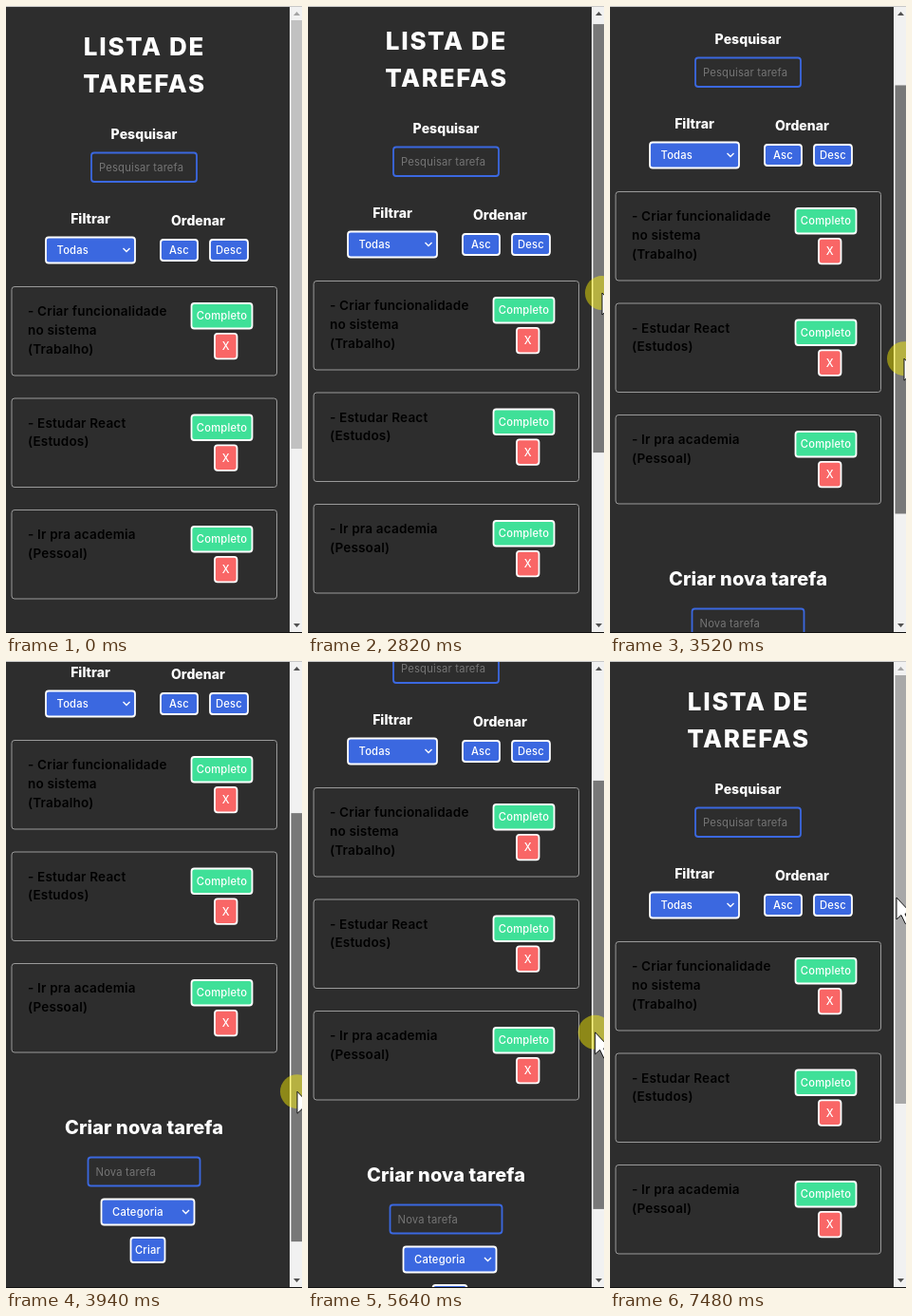
Animation, 312 px wide and 660 px high, one loop 8 s. Source, as an HTML page:

```html
<!DOCTYPE html>
<html lang="pt">
<head>
<meta charset="utf-8">
<title>Lista de tarefas</title>
<style>
html, body { margin: 0; width: 100%; height: 100%; overflow: hidden; background: #2d2d2d; }
svg { display: block; }
text { font: 500 11.2px Inter, "Open Sans", sans-serif; letter-spacing: .2px; fill: #fff; }
.mid { text-anchor: middle; }
.title { font-size: 26px; font-weight: 800; letter-spacing: 1.7px; }
.label { font-size: 14px; font-weight: 800; letter-spacing: .05px; }
.head { font-size: 20px; font-weight: 800; letter-spacing: .1px; }
.task { font-size: 13.5px; font-weight: 600; letter-spacing: .2px; fill: #000; }
.hint { font-weight: 400; fill: #757575; }
</style>
</head>
<body>
<svg width="312" height="660" viewBox="0 0 312 660">
  <rect width="312" height="660" fill="#2d2d2d"/>
  <g id="page"></g>
  <rect width="312" height="1" fill="#c8c8c8"/>
  <rect y="659" width="312" height="1" fill="#111"/>
  <rect x="299" y="1" width="13" height="658" fill="#f1f1f1"/>
  <rect id="thumb" x="300.5" width="11.5" height="451"/>
  <path id="up" d="M303 10l3.5-4 3.5 4z"/>
  <path id="down" d="M303 650l3.5 4 3.5-4z"/>
  <g id="pointer">
    <circle id="halo" r="18" fill="rgba(255,245,0,.46)"/>
    <path d="M0 0V23L5 18.5 9.3 27.5 12.8 26 9 17H16Z" fill="#fff" stroke="#111"/>
  </g>
</svg>
<script>
const $ = id => document.getElementById(id);
const BLUE = '#3b68e0', GREEN = '#3fe098', RED = '#f96666';
const MAX_SCROLL = 260, THUMB_TRAVEL = 178;
const PRESS = 2620, RELEASE = 7480, LOOP = 8000;

const text = (x, y, str, cls = '') => `<text x="${x}" y="${y}" class="${cls}">${str}</text>`;
const box = (x, y, w, h, fill, stroke = '#fff') =>
  `<rect x="${x + 1}" y="${y + 1}" width="${w - 2}" height="${h - 2}" rx="3" fill="${fill}" stroke="${stroke}" stroke-width="1.8"/>`;
const button = (x, y, w, h, str, fill = BLUE) =>
  box(x, y, w, h, fill) + text(x + w / 2, y + h / 2 + 4, str, 'mid');
const input = (x, y, w, h, str) =>
  box(x, y, w, h, 'none', BLUE) + text(x + 9, y + 20, str, 'hint');
const select = (x, y, w, h, str) =>
  box(x, y, w, h, BLUE) + text(x + 12.5, y + 18, str) +
  `<path d="M${x + w - 13.5} ${y + 12.5}l3.5 3.5 3.5-3.5" fill="none" stroke="#fff" stroke-width="1.4"/>`;
const card = (lines, i) => {
  const y = 295 + i * 117.5;
  return `<rect x="6" y="${y + .5}" width="279.5" height="93.5" rx="3" fill="none" stroke="#9a9a9a"/>` +
    lines.map((s, n) => text(23, y + 31 + n * 19.8, s, 'task')).join('') +
    button(194.5, y + 17, 66, 28.5, 'Completo', GREEN) +
    button(219, y + 48.8, 25.5, 28.5, 'X', RED);
};

$('page').innerHTML = [
  text(146, 52, 'LISTA DE', 'title mid'),
  text(146, 91, 'TAREFAS', 'title mid'),
  text(145.5, 140, 'Pesquisar', 'label mid'),
  input(89, 153.5, 113, 32.5, 'Pesquisar tarefa'),
  text(89, 229, 'Filtrar', 'label mid'),
  text(202.5, 231, 'Ordenar', 'label mid'),
  select(41, 242.5, 96, 29, 'Todas'),
  button(162, 245, 41, 24, 'Asc'),
  button(214, 245, 42, 24, 'Desc'),
  ...[
    ['- Criar funcionalidade', 'no sistema', '(Trabalho)'],
    ['- Estudar React', '(Estudos)'],
    ['- Ir pra academia', '(Pessoal)']
  ].map(card),
  text(145.5, 710, 'Criar nova tarefa', 'head mid'),
  input(85.5, 733.5, 120, 32, 'Nova tarefa'),
  select(99.5, 777.5, 100, 29, 'Categoria'),
  button(130.5, 818, 38, 28, 'Criar')
].join('');

// time, pointer x, pointer y, scroll offset
const keys = [
  [1200, 288, 640, 0], [1950, 304, 311, 0], [2360, 308, 297, 0], [2620, 309, 298, 0],
  [2820, 310, 302, 6], [3520, 310, 371, 100], [3940, 307, 453, 212], [4180, 305, 512, 260],
  [4280, 304, 525, 260], [4630, 292, 487, 260], [4960, 292, 487, 260], [5170, 292, 478, 260],
  [5260, 295, 466, 257], [5990, 306, 319, 43], [6180, 305, 288, 0], [6480, 304, 256, 0],
  [6750, 302, 249, 0], [8000, 302, 249, 0]
];

const slope = (i, c) => keys[i] && keys[i + 1]
  ? (keys[i + 1][c] - keys[i][c]) / (keys[i + 1][0] - keys[i][0]) : 0;
const tangent = (i, c) => {
  const a = slope(i - 1, c), b = slope(i, c);
  return a * b > 0 ? 2 * a * b / (a + b) : 0;
};

// Monotone cubic through the keys
function value(t, c) {
  if (t <= keys[0][0]) return keys[0][c];
  const i = keys.findIndex(k => k[0] > t) - 1;
  const [a, b] = [keys[i], keys[i + 1]];
  const d = b[0] - a[0], u = (t - a[0]) / d, v = 1 - u;
  return v * v * (1 + 2 * u) * a[c] + u * u * (3 - 2 * u) * b[c] +
    d * u * v * (v * tangent(i, c) - u * tangent(i + 1, c));
}

function draw(t) {
  const x = value(t, 1), y = value(t, 2), scroll = Math.round(value(t, 3));
  const pressed = t >= PRESS && t < RELEASE;
  const hover = t >= keys[0][0] && x > 300 && y < 466;
  $('page').setAttribute('transform', `translate(0 ${-scroll})`);
  $('thumb').setAttribute('y', 15 + scroll / MAX_SCROLL * THUMB_TRAVEL);
  $('thumb').setAttribute('fill', pressed ? '#787878' : hover ? '#a8a8a8' : '#c1c1c1');
  $('up').setAttribute('fill', scroll > 0 ? '#505050' : '#a3a3a3');
  $('down').setAttribute('fill', scroll < MAX_SCROLL ? '#505050' : '#a3a3a3');
  $('pointer').setAttribute('transform', `translate(${x} ${y})`);
  $('pointer').setAttribute('visibility', t < keys[0][0] ? 'hidden' : 'visible');
  $('halo').setAttribute('opacity', pressed ? 1 : 0);
}

const start = performance.now();
function tick() {
  draw((performance.now() - start) % LOOP);
  requestAnimationFrame(tick);
}
tick();
</script>
</body>
</html>
```
